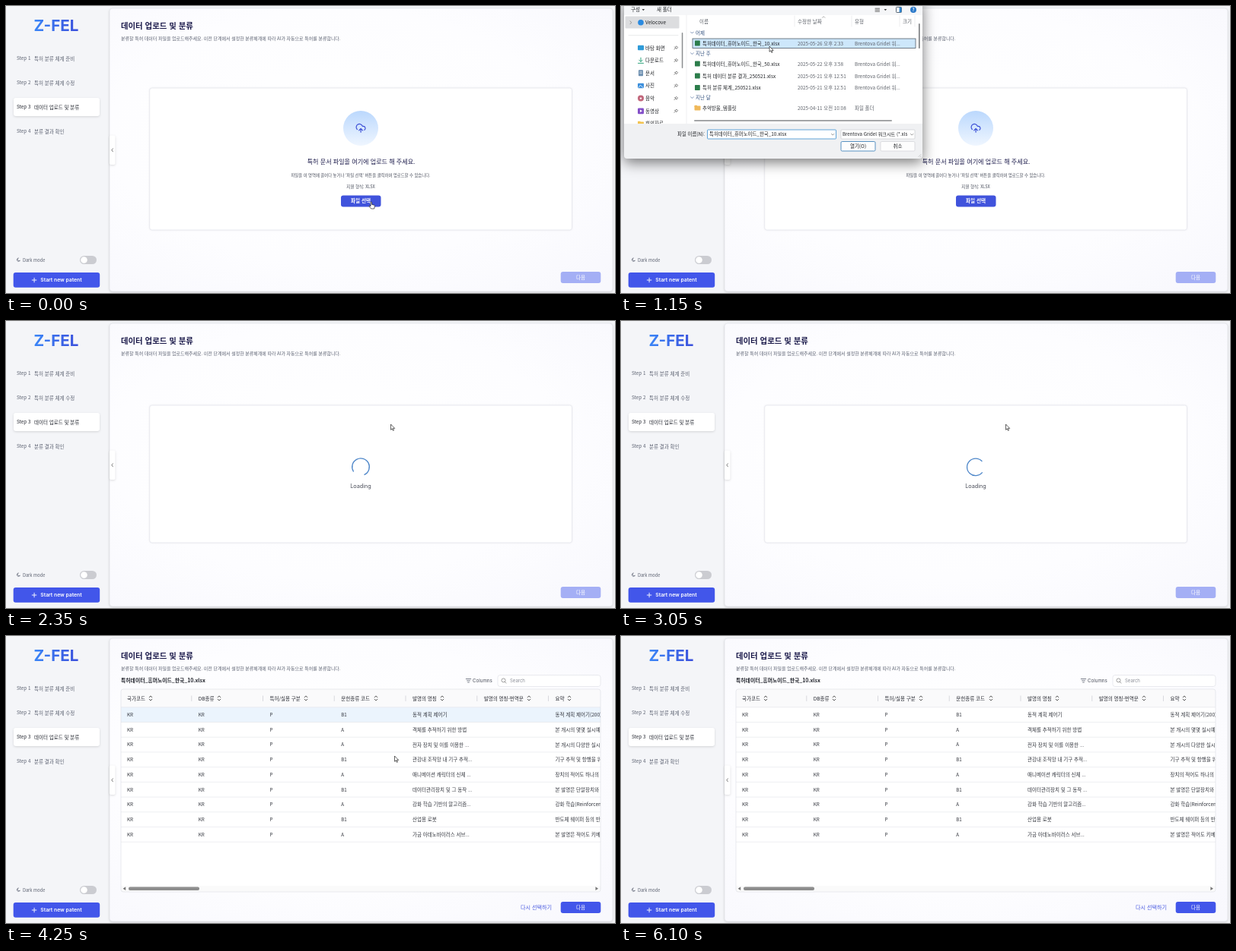
Write an HTML page that moves like this. It is 800x378 px and loops after 6150 ms.

```html
<!DOCTYPE html>
<html lang="ko">
<head>
<meta charset="utf-8">
<style>
html, body { margin: 0; width: 100%; height: 100%; overflow: hidden; background: #f4f5f8; }
svg { display: block; width: 800px; height: 378px; }
text { font-family: 'Noto Sans CJK KR', 'Noto Sans KR', sans-serif; white-space: pre; }
.inter { font-family: Inter, sans-serif; }
.mid { text-anchor: middle; }
.m { font-weight: 500; }
.b { font-weight: 700; }
.sb { font-weight: 600; }
.shadow { filter: drop-shadow(0 1px 1.5px #0002); }
.soft { filter: drop-shadow(0 .5px 1px #0001); }
.deep { filter: drop-shadow(0 5px 9px #0008); }
</style>
</head>
<body>
<svg id="stage" viewBox="0 0 800 378">
  <defs>
    <linearGradient id="brand"><stop stop-color="#3b86f7"/><stop offset="1" stop-color="#3a4fdc"/></linearGradient>
    <linearGradient id="sky" x2="0" y2="1"><stop stop-color="#bbd8fd"/><stop offset="1" stop-color="#eff6ff"/></linearGradient>
    <radialGradient id="panel" cx=".45" cy=".45" r=".75"><stop stop-color="#fff"/><stop offset=".6" stop-color="#fdfdff"/><stop offset="1" stop-color="#f8f8fd"/></radialGradient>
    <clipPath id="tableClip"><rect x="151" y="70" width="630" height="267" rx="3"/></clipPath>
  </defs>
</svg>
<script>
const BLUE = '#4256ea', NAVY = '#1c1b4b', GREY = '#5b6170';

// y is the vertical centre of the line
const T = (x, y, s, size = 6.5, fill = '#30333b', cls = '') =>
  `<text x="${x}" y="${y + size * (cls.includes('inter') ? .36 : .39)}" font-size="${size}" fill="${fill}" class="${cls}">${s}</text>`;
const R = (x, y, w, h, fill, rx = 0, more = '') =>
  `<rect x="${x}" y="${y}" width="${w}" height="${h}" rx="${rx}" fill="${fill}" ${more}/>`;
const L = (d, stroke, w = .6, more = '') =>
  `<path d="${d}" fill="none" stroke="${stroke}" stroke-width="${w}" stroke-linecap="round" stroke-linejoin="round" ${more}/>`;
const C = (x, y, r, fill) => `<circle cx="${x}" cy="${y}" r="${r}" fill="${fill}"/>`;
const G = (id, body) => `<g id="${id}">${body}</g>`;
const edge = (c, w = .6) => `stroke="${c}" stroke-width="${w}"`;

function frame() {
  const steps = ['특허 분류 체계 준비', '특허 분류 체계 수정', '데이터 업로드 및 분류', '분류 결과 확인'];
  return R(0, 0, 800, 378, '#f4f5f8') +
    R(136, 3, 661, 373, 'url(#panel)', 4, edge('#dcdde3') + ' class="shadow"') +
    T(66, 25.8, 'Z-FEL', 20.6, 'url(#brand)', 'inter b mid') +
    R(10, 121, 113, 24, '#fff', 3, 'class="shadow"') +
    steps.map((s, i) => {
      const color = i === 2 ? '#23262f' : GREY, y = 69 + 32 * i;
      return T(14, y, 'Step ' + (i + 1), 6.3, color) + T(37, y, s, 6.5, color);
    }).join('') +
    L('M16 332a2.2 2.2 0 1 0 2.4 3.2a2 2 0 0 1-2.4-3.2', GREY, .7) +
    T(22, 334.5, 'Dark mode', 5.7, GREY) +
    R(97, 329, 22, 11, '#cbccd1', 5.5) + C(102.5, 334.5, 4.3, '#fff') +
    R(9.7, 351, 113.5, 19.8, BLUE, 3) + L('M34.3 361h5.6M37.1 358.2v5.6', '#fff', .9) +
    T(45.3, 360.8, 'Start new patent', 6.8, '#fff', 'inter sb') +
    R(136, 170.5, 7.5, 38.5, '#fff', 2, 'class="shadow"') + L('M140.4 187.8l-1.6 2l1.6 2', '#444', .7) +
    T(151, 26, '데이터 업로드 및 분류', 10.4, NAVY, 'b') +
    T(151, 42.3, '분류할 특허 데이터 파일을 업로드해주세요. 이전 단계에서 설정한 분류체계에 따라 AI가 자동으로 특허를 분류합니다.', 5.97, GREY);
}

const card = (y, h) => R(188.7, y, 554.8, h, '#fff', 3, edge('#e4e5ec', .8) + ' class="soft"');
const nextButton = fill => R(728.7, 350, 52.6, 15, fill, 3) + T(755, 357.3, '다음', 6.6, '#fff', 'm mid');

function upload() {
  return card(108, 187) + C(466, 161, 23, 'url(#sky)') +
    L('M12 13v8M4 14.9A7 7 0 1 1 15.7 8h1.8a4.5 4.5 0 0 1 2.5 8.2M8 17l4-4 4 4', '#3c4fd6', 2,
      'transform="translate(458.9 153.6) scale(.6)"') +
    T(466.5, 204.5, '특허 문서 파일을 여기에 업로드 해 주세요.', 8.05, NAVY, 'm mid') +
    T(466, 223.2, "파일을 이 영역에 끌어다 놓거나 '파일 선택' 버튼을 클릭하여 업로드할 수 있습니다.", 5.35, '#454a58', 'mid') +
    T(466, 238.3, '지원 형식: XLSX', 5.5, '#454a58', 'mid') +
    R(440, 249.5, 52.5, 15, '#4053dc', 3) + T(466, 256.8, '파일 선택', 6.6, '#fff', 'b mid') +
    nextButton('#a4aff5');
}

function loading() {
  return card(111, 181) +
    L('M471 202.3A11.3 11.3 0 1 0 456.4 198.1', '#4d86c9', 1.3, 'id="spinner"') +
    T(466, 217.3, 'Loading', 7.3, '#4b4f5a', 'inter mid') + nextButton('#a4aff5');
}

const ROW = 19.72, rowY = i => 93.8 + ROW * i;

function table() {
  const heads = [['국가코드', 190], ['DB종류', 280], ['특허/실용 구분', 394], ['문헌종류 코드', 486],
    ['발명의 명칭', 573], ['발명의 명칭-번역문', 687], ['요약', 740]];
  const rows = [
    ['B1', '동적 계획 제어기', '동적 계획 제어기(200)는 로봇'],
    ['A', '객체를 추적하기 위한 방법', '본 개시의 몇몇 실시예에 따른'],
    ['A', '전자 장치 및 이를 이용한 ...', '본 개시의 다양한 실시예에'],
    ['B1', '관강내 조직망 내 기구 추적...', '기구 추적 및 항행을 위한'],
    ['A', '애니메이션 캐릭터의 신체 ...', '장치의 적어도 하나의 프로'],
    ['B1', '데이터관리장치 및 그 동작 ...', '본 발명은 단말장치와 서버'],
    ['A', '강화 학습 기반의 알고리즘...', '강화 학습(Reinforcement'],
    ['B1', '산업용 로봇', '반도체 웨이퍼 등의 반송'],
    ['A', '가금 아데노바이러스 서브...', '본 발명은 적어도 키메라']];
  const colX = i => 159 + 93.75 * i;
  const head = heads.map(([s, x], i) => T(colX(i), 82, s, 6.5, '#24262e', 'm') +
    L(`M${x - 1.8} 80.8l1.8-1.9l1.8 1.9M${x - 1.8} 83.2l1.8 1.9l1.8-1.9`, '#333', .8) +
    (i ? L(`M${colX(i) - 9} 79v6.5`, '#c9cbd2', .7) : '')).join('');
  const body = rows.map(([kind, name, note], i) => {
    const cells = ['KR', 'KR', 'P', kind, name, '', note];
    return cells.map((s, k) => T(colX(k), rowY(i) + 9.8, s, k > 3 ? 6.5 : 6.2)).join('') +
      L(`M151 ${rowY(i + 1)}H781`, '#e3e4e9');
  }).join('');
  return T(151, 58.7, '특허데이터_휴머노이드_한국_10.xlsx', 6.85, '#22242c', 'b') +
    L('M604.3 56.5h6.4M605.5 58.8h4M606.6 61h1.8', GREY, .8) +
    T(613, 58.8, 'Columns', 6.2, '#4b4f5a', 'inter') +
    R(646, 51.5, 135, 15, '#fff', 3, edge('#dcdde4')) +
    `<circle cx="653.5" cy="58.4" r="2.5" fill="none" ${edge('#777', .7)}/>` + L('M655.4 60.4l1.6 1.7', '#777', .7) +
    T(662, 58.8, 'Search', 6, '#8a8d96', 'inter') +
    `<g clip-path="url(#tableClip)">` + R(151, 70, 630, 267, '#fff') + R(151, 70, 630, 24, '#fafafb') +
    R(151, 0, 630, ROW, '#ebf4fd', 0, 'id="hover"') + head + L('M151 93.8H781', '#dfe0e6') + body +
    R(151, 329, 630, 8, '#fafafa') + R(161, 330.4, 93, 4.6, '#8d8d8d', 2) +
    `<path d="M153.6 332.7l3.6-2.4v4.8zM778 332.7l-3.6-2.4v4.8z" fill="#777"/></g>` +
    R(151, 70, 630, 267, 'none', 3, edge('#dcdde4')) +
    T(676, 357.6, '다시 선택하기', 7.1, '#4a5be0') + nextButton(BLUE);
}

function dialog() {
  const nav = [['바탕 화면', '#2f9bd8'], ['다운로드', '#2fa37c'], ['문서', '#6d8fb0'], ['사진', '#3c8fdc'],
    ['음악', '#c2677c'], ['동영상', '#8450c8'], ['회의자료', '#f3c451']];
  const sheet = 'Brentova Gridel 워';
  const files = [
    [49, '특허데이터_휴머노이드_한국_10.xlsx', '2025-05-26 오후 2:33'],
    [76, '특허데이터_휴머노이드_한국_50.xlsx', '2025-05-22 오후 3:58'],
    [92, '특허 데이터 분류 결과_250521.xlsx', '2025-05-21 오후 12:51'],
    [107.5, '특허 분류 체계_250521.xlsx', '2025-05-21 오후 12:51'],
    [134, '추억방울_템플릿', '2025-04-11 오전 10:08']];
  const groups = [[35, '어제'], [62.5, '지난 주'], [120.5, '지난 달']];
  const folder = (x, y, c) => R(x, y - 3.2, 3.6, 2, c, .6) + R(x, y - 2.5, 8, 6, c, .8);
  const dark = '#1e2024', dim = '#5c6068';
  const navRow = ([s, c], i) => {
    const y = 55 + 16.65 * i;
    const icon = i === 6 ? folder(22, y, c)
      : i === 1 ? L(`M26 ${y - 3.5}v5M23.8 ${y - .5}l2.2 2.2l2.2-2.2M22.5 ${y + 3.7}h7`, c, 1)
      : i === 4 ? C(26, y, 4, c) + C(26, y, 1.2, '#fff')
      : i === 2 ? R(23, y - 4, 6, 8, c, .8) + L(`M24.5 ${y - 1.5}h3M24.5 ${y + .5}h3`, '#fff')
      : i === 5 ? R(22, y - 3.7, 8, 7.6, c, 1.2) + `<path d="M25 ${y - 1.8}v3.6l3-1.8z" fill="#fff"/>`
      : R(22, y - 3.3, 8, 6.6, c, 1) + (i === 3 ? L(`M23 ${y + 2.4}l2.4-3l3.6 3`, '#fff', .8) : '');
    return icon + T(32, y, s, 6.5, dark) +
      (i < 6 ? L(`M70 ${y + 2}l1.7-1.7M70.5 ${y - 1}l2.4 2.4M71.3 ${y - .8}l1.7-1.4l1.6 1.6l-1.4 1.7`, '#777', .9) : '');
  };
  return R(4, -10, 392, 211, '#f0f1f3', 4, 'class="deep"') +
    R(4, -5, 392, 17, '#f5f6f8') + R(4, 12, 392, 143, '#fff') +
    T(13, 4.8, '구성', 6.5, dark) + `<path d="M27.5 4h3.6l-1.8 2.2z" fill="#444"/>` + T(47, 4.8, '새 폴더', 6.5, dark) +
    L('M334 3.2h5.5M334 5.2h5.5M334 7.2h5.5', '#444', .8) + `<path d="M345.5 4h3.6l-1.8 2.2z" fill="#444"/>` +
    R(361.5, 1.5, 7, 7, '#fff', .8, edge('#345', .8)) + R(365.6, 1.8, 2.8, 6.4, '#2d86d3') +
    C(384, 5, 4, '#2b79c9') + T(384, 5, '?', 6, '#fff', 'b mid') +
    R(5.5, 13.5, 71, 16, '#dcdddf', 1) + L('M12 19.8l1.7 2l-1.7 2', '#777', .7) +
    C(26, 21.8, 3.8, '#2a8ae0') + T(32, 21.8, 'Velocove', 6.5, dark) +
    L('M10 38.5H75', '#dcdde0') + nav.map(navRow).join('') +
    R(79.8, 35, 1.5, 47, '#8b8d90', .8) + L('M86 12V155', '#e4e5e8') +
    T(103, 20, '이름', 6.5, dim) + T(232, 20, '수정한 날짜', 6.5, dim) + T(307, 20, '유형', 6.5, dim) + T(370, 20, '크기', 6.5, dim) +
    L('M264.5 15.4l1.7-1.7l1.7 1.7', '#777') + L('M228 13v14M303 13v14M366 13v14M386 13v14', '#e1e2e5') +
    groups.map(([y, s]) => L(`M91.6 ${y - .8}l1.8 1.8l1.8-1.8`, '#4b6a9b', .7) + T(98, y, s, 6.5, '#33517f')).join('') +
    R(94, 43, 293, 12.4, '#cde7fb', 0, 'id="pick"') +
    files.map(([y, name, date], i) => (i < 4 ? R(97, y - 3.4, 6.8, 6.8, '#2c7d4b', .6) : folder(96.5, y, '#f0b95a')) +
      T(107, y + .2, name, 6.4, dark) + T(232, y + .2, date, 6.35, dim) +
      T(307, y + .2, i < 4 ? sheet + '...' : '파일 폴더', 6.4, dim)).join('') +
    R(391, 23, 1.6, 33, '#777a7d', .8) + R(96, 150.2, 260, 1.6, '#85888b', .8) +
    R(4, 155, 392, 42, '#f0f1f3') +
    T(74, 169, '파일 이름(N):', 6.4, dark) +
    R(113.5, 163, 169, 12, '#fff', 1, 'id="field"') + T(116, 169, '특허데이터_휴머노이드_한국_10.xlsx', 6.4, dark, 'name') +
    R(289, 163, 97, 12, '#fff', 1, edge('#c4c6ca')) + T(291, 169, sheet + '크시트 (*.xls', 6.15, dark) +
    L('M276.5 168.4l1.7 1.7l1.7-1.7M380.5 168.4l1.7 1.7l1.7-1.7', '#555') +
    R(289, 178.5, 45, 12.5, '#fff', 1.5, 'id="open"') + T(311.5, 184.7, '열기(O)', 6.5, dark, 'mid') +
    R(341, 178.5, 45, 12.5, '#fdfdfd', 1.5, edge('#c9cbd0')) + T(363.5, 184.7, '취소', 6.5, dark, 'mid') +
    L('M394 195.5l-3 3M394 198l-1 1', '#aaa');
}

const arrow = `<path d="M0 0V7.3L1.7 5.8L2.9 8.4L4 7.9L2.9 5.4H5.2Z" fill="#fff" ${edge('#222', .7)} stroke-linejoin="round"/>`;
const hand = `<path d="M0 .4Q.8-.5 1.5 .4V3.4L4.6 4.2Q5.6 4.6 5.4 5.8L4.7 9H.7L-2 5.9Q-1.9 4.8-.9 5.2L0 6Z" fill="#fff" ${edge('#222', .7)} stroke-linejoin="round"/>`;

const stage = document.getElementById('stage');
stage.innerHTML += frame() + G('upload', upload()) + G('loading', loading()) + G('table', table()) +
  G('dialog', dialog()) + G('cursor', G('arrow', arrow) + G('hand', hand));
const $ = id => document.getElementById(id);
const show = (el, on) => { el.style.display = on ? '' : 'none'; };
const set = (el, attrs) => { for (const k in attrs) el.setAttribute(k, attrs[k]); };
const nameText = stage.querySelector('.name');

const LOOP = 6150, OPEN = 350, PICK = 1000, PRESS = 1900, LOAD = 2100, READY = 3400, GONE = 4800;
// time, x, y of the pointer tip
const path = [[0, 479, 258], [400, 479, 258], [950, 195, 53], [1300, 195, 53], [1800, 310, 190], [2080, 310, 190],
  [2320, 505.5, 136], [3300, 505.5, 136], [3500, 508, 136], [3950, 508, 136], [4200, 510.5, 158], [4350, 510.5, 158], [4780, 520, -12]];
// time, hovered row
const hovers = [[READY, 2], [4000, 3], [4200, 0], [4600, -1]];

function pointer(t) {
  const i = path.findIndex(p => p[0] > t);
  if (i < 0) return path.at(-1).slice(1);
  const [t0, x0, y0] = path[i - 1], [t1, x1, y1] = path[i];
  const u = (t - t0) / (t1 - t0), e = u * u * (3 - 2 * u);
  return [x0 + (x1 - x0) * e, y0 + (y1 - y0) * e];
}

function draw(now) {
  const t = now % LOOP;
  const picked = t >= PICK, pressed = t >= PRESS;
  show($('upload'), t < LOAD);
  show($('loading'), t >= LOAD && t < READY);
  show($('table'), t >= READY);
  show($('dialog'), t >= OPEN && t < LOAD);
  show($('pick'), picked);
  show(nameText, picked);
  set($('pick'), pressed ? { fill: '#d9d9d9', stroke: 'none' } : { fill: '#cde7fb', stroke: '#53606c', 'stroke-width': .8 });
  set($('field'), { stroke: picked && !pressed ? '#3c8fd0' : '#b9bcc1', 'stroke-width': .8 });
  set($('open'), { fill: pressed ? '#cfe6f8' : '#fdfdfd', stroke: '#3279b5', 'stroke-width': .8 });
  set($('spinner'), { transform: `rotate(${(t - 2350) * .36} 466 192.3)` });
  const row = hovers.filter(h => h[0] <= t).at(-1)?.[1] ?? -1;
  show($('hover'), row >= 0);
  set($('hover'), { y: rowY(row) });
  show($('cursor'), t < GONE);
  show($('hand'), t < OPEN);
  show($('arrow'), t >= OPEN);
  set($('cursor'), { transform: `translate(${pointer(t)})` });
}

const start = performance.now();
function tick() {
  draw(performance.now() - start);
  requestAnimationFrame(tick);
}
tick();
</script>
</body>
</html>
```
